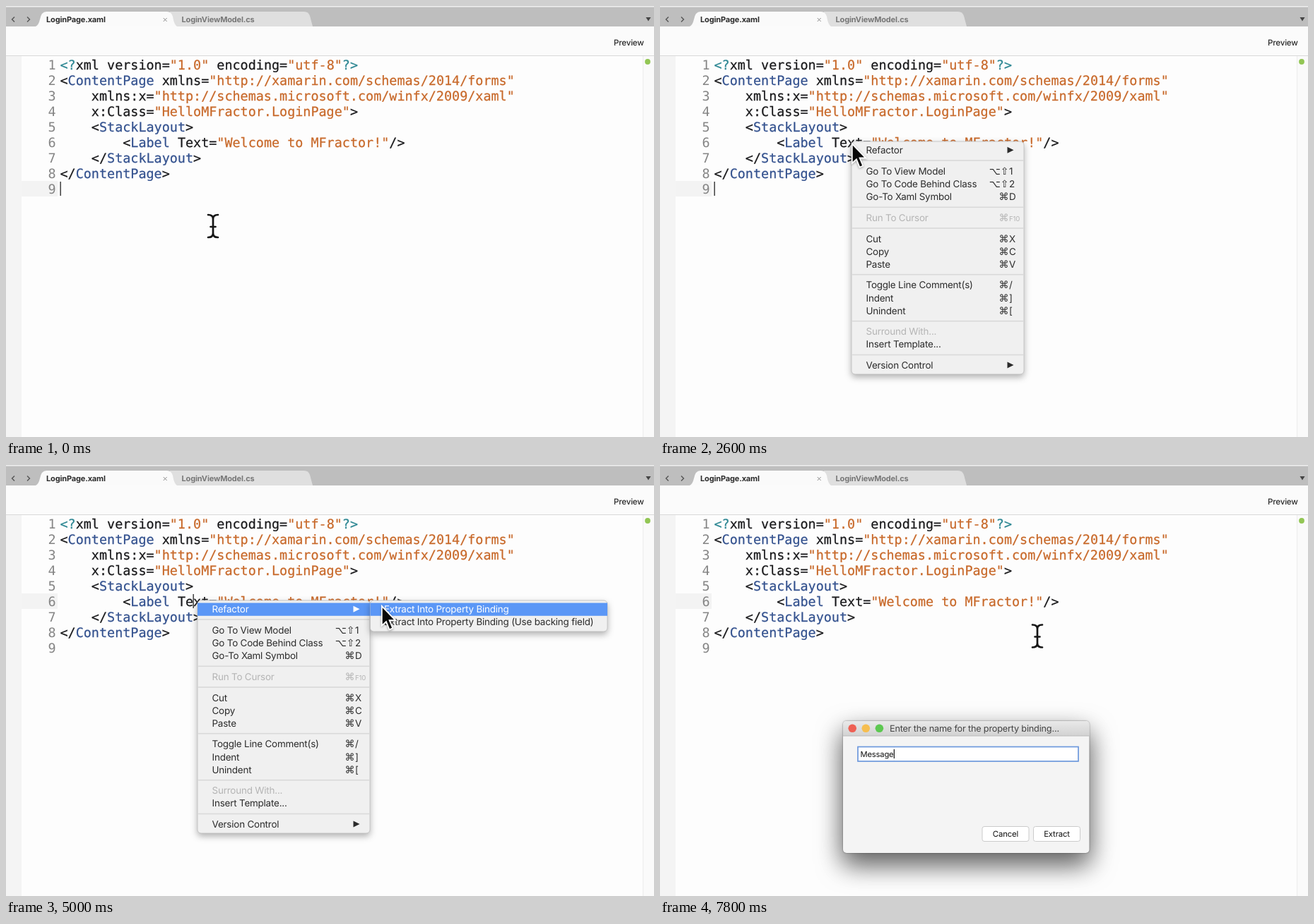
An HTML page that plays this animation: 917 by 611 pixels, repeating every 8000 ms.

```html
<!DOCTYPE html>
<html lang="en">
<head>
<meta charset="utf-8">
<title>Extract property binding</title>
<style>
html, body { margin: 0; width: 100%; height: 100%; overflow: hidden; background: #fdfdfd; }
svg { display: block; width: 100vw; height: 100vh; }
text { white-space: pre; font: 13.43px Inter, "Noto Sans", sans-serif; letter-spacing: -.015em; fill: #2b2b2b; text-rendering: geometricPrecision; }
.code { font: 18.43px "DejaVu Sans Mono", monospace; letter-spacing: 0; fill: #1a1a1c; stroke: #1a1a1c; stroke-width: .25; }
.num { fill: #858585; stroke: none; text-anchor: end; }
.tag { fill: #34528f; stroke: #34528f; }
.str { fill: #c8692a; stroke: #c8692a; }
.pi { fill: #2d8793; stroke: #2d8793; }
.tab { font-size: 11px; font-weight: 700; }
.sig { font: 10.5px "DejaVu Sans Mono", monospace; letter-spacing: 0; }
.key { fill: #2b938d; }
.type { fill: #3a62a8; }
.body { font-size: 10.93px; fill: #444; }
.small { font-size: 8.95px; fill: #444; }
.mods { font: 14px "DejaVu Sans", sans-serif; letter-spacing: 0; text-anchor: end; }
.off { fill: #b4b4b4; }
.lit { fill: #fff; }
.field { font-size: 11.2px; fill: #111; }
.button { font-size: 11.4px; text-anchor: middle; fill: #111; }
.panel { fill: #f0f0f0; stroke: #bdbdbd; stroke-width: .8; filter: drop-shadow(0 4px 5px rgba(0,0,0,.3)); }
</style>
</head>
<body>
<svg id="stage" viewBox="0 0 917 611" preserveAspectRatio="none"></svg>
<script>
const LOOP = 8000, STEP = 200;

const esc = s => s.replace(/&/g, '&amp;').replace(/</g, '&lt;').replace(/>/g, '&gt;');
const span = (cls, s, extra = '') => `<tspan class="${cls}" ${extra}>${esc(s)}</tspan>`;
const rich = (x, y, inner, cls = '', id = '') =>
  `<text x="${x}" y="${y}" class="${cls}" id="${id}">${inner}</text>`;
const text = (x, y, s, cls, id) => rich(x, y, esc(s), cls, id);
const rect = (x, y, w, h, fill, extra = '') =>
  `<rect x="${x}" y="${y}" width="${w}" height="${h}" fill="${fill}" ${extra}/>`;
const path = (d, fill, extra = '') => `<path d="${d}" fill="${fill}" ${extra}/>`;
const group = (id, inner) => `<g id="${id}">${inner}</g>`;
const arrowRight = y => path(`M491.5 ${y - 4.5}L500.5 ${y}L491.5 ${y + 4.5}Z`, 'currentColor');

const source = [
  '<?xml version="1.0" encoding="utf-8"?>',
  '<ContentPage xmlns="http://xamarin.com/schemas/2014/forms"',
  '    xmlns:x="http://schemas.microsoft.com/winfx/2009/xaml"',
  '    x:Class="HelloMFractor.LoginPage">',
  '    <StackLayout>',
  '        <Label Text="Welcome to MFractor!"/>',
  '    </StackLayout>',
  '</ContentPage>',
  ''
];

function highlight(line) {
  return line.split(/("[^"]*"|<\?|\?>|<\/?[A-Z]\w+)/).map(part => {
    if (part[0] === '"') return span('str', part);
    if (part === '<?' || part === '?>') return span('pi', part);
    const tag = part.match(/^(<\/?)([A-Z]\w+)$/);
    return tag ? esc(tag[1]) + span('tag', tag[2]) : esc(part);
  }).join('');
}

function editor() {
  const lines = source.map((line, i) => {
    const y = 90 + i * 22;
    return text(70.5, y, String(i + 1), 'code num') + rich(76.5, y, highlight(line), 'code');
  }).join('');
  return rect(0, 0, 917, 611, '#fdfdfd') +
    rect(0, 71, 22, 540, '#f4f4f4') +
    rect(901, 71, 16, 540, '#fafafa') + rect(901, 71, 1, 540, '#ececec') +
    '<circle cx="908" cy="79" r="3.9" fill="#92c654"/>' +
    rect(22, 248, 51, 22, '#f3f3f3', 'id="row"') + lines +
    rect(76.5, 249, 1.3, 20, '#222', 'id="caret"');
}

function chrome() {
  const stroke = 'stroke="#555" stroke-width="1.4"';
  return rect(0, 0, 917, 1.5, '#ededed') + rect(0, 1.5, 917, 28, '#bebebe') +
    path('M232 8H422Q428 8 430 14L434 29H232Z', '#dfdfdf') +
    path('M41 29.5Q46 28 48 19Q50 8 57 8H228Q234 8 236 15Q238 28 243 29.5Z', '#fafafa') +
    rect(0, 29, 917, 41, '#fbfbfb') + rect(0, 70, 917, 1, '#d9d9d9') +
    path('M12 15.5L8.5 19L12 22.5M30 15.5L33.5 19L30 22.5', 'none', stroke) +
    path('M222.7 17L227.7 22M227.7 17L222.7 22', 'none', 'stroke="#8c8c8c"') +
    path('M905.5 16H912.5L909 21.5Z', '#444') +
    text(57, 23, 'LoginPage.xaml', 'tab') +
    rich(248.5, 23, span('', 'LoginViewModel.cs', 'fill="#777"'), 'tab') +
    rich(860, 56, span('', 'Preview', 'font-size="11.6" font-weight="500"'));
}

function tooltip() {
  const keys = s => span('key', s);
  const italic = (s, rest) => span('', s, 'font-style="italic"') + esc(rest);
  return rect(104, 210, 334, 177.5, '#fafae6', 'rx="3" stroke="#f3f3e2" stroke-width=".8"') +
    rich(116.5, 229.5, keys('public') + ' ' + span('type', 'string') + ' Text { ' +
      keys('get') + '; ' + keys('set') + '; }', 'sig') +
    rich(116.5, 262.5, span('', 'Summary', 'font-size="11.8" font-weight="700"'), 'body') +
    text(116.5, 283.5, 'Gets or sets the text for the Label. This is a bindable property.', 'body') +
    text(116.5, 305.3, 'From type:', 'small') + text(175.5, 305.3, 'Label', 'small') +
    text(116.5, 316, 'Assembly:', 'small') + text(175.5, 316, 'Xamarin.Forms.Core', 'small') +
    rich(116.5, 338.7, italic('Command+D', ' to go to declaration'), 'small') +
    rich(116.5, 349, italic('Alt+Enter', ' to view 1 available code action'), 'small') +
    rich(116.5, 370, span('', 'Powered By KWendral', 'font-size="7.7" font-weight="700"'), 'small');
}

const menuItems = [
  [234, 'Go To View Model', '⌥⇧', '1'],
  [252.3, 'Go To Code Behind Class', '⌥⇧', '2'],
  [270.5, 'Go-To Xaml Symbol', '⌘', 'D'],
  [300, 'Run To Cursor', '⌘', 'F10', 'off'],
  [329.7, 'Cut', '⌘', 'X'],
  [348, 'Copy', '⌘', 'C'],
  [366, 'Paste', '⌘', 'V'],
  [395.5, 'Toggle Line Comment(s)', '⌘', '/'],
  [413.7, 'Indent', '⌘', ']'],
  [432, 'Unindent', '⌘', '['],
  [461.3, 'Surround With...', '', '', 'off'],
  [479.5, 'Insert Template...', '', ''],
  [509, 'Version Control', '', '']
];

function menu() {
  const items = menuItems.map(([y, label, mods, key, cls = '']) =>
    text(291.5, y + 4.8, label, cls) + text(493.5, y + 4.8, mods, 'mods ' + cls) +
    rich(494, y + 4.8, span(cls, key, key.length > 1 ? 'font-size="9.6"' : ''))).join('');
  const rules = [219, 285.3, 315, 380.7, 446.7, 494.5]
    .map(y => rect(271.5, y - .8, 243, 1.6, '#d9d9d9')).join('');
  return rect(271, 192, 244, 330, '', 'rx="5" class="panel"') + rules + items +
    `<g color="#2b2b2b">${arrowRight(509)}</g>` +
    rect(271, 195.5, 244, 18.3, '#5b97f6', 'id="refactorBar"') +
    text(291.5, 209, 'Refactor', '', 'refactorText') +
    `<g id="refactorArrow" color="#2b2b2b">${arrowRight(204.3)}</g>`;
}

function submenu() {
  return rect(515.4, 192, 335.6, 44, '', 'rx="5" class="panel"') +
    rect(515.4, 195.5, 335.6, 18.3, '#5b97f6', 'id="extractBar"') +
    text(535, 209, 'Extract Into Property Binding', '', 'extractText') +
    text(535, 227.3, 'Extract Into Property Binding (Use backing field)');
}

function dialog() {
  const lights = ['#ee6054', '#f6be4f', '#5dc851']
    .map((c, i) => `<circle cx="${272.2 + i * 19.1}" cy="373.3" r="5.8" fill="${c}"/>`).join('');
  const button = (x, label) =>
    rect(x, 512.5, 66, 21, '#fff', 'rx="3" stroke="#cbcbcb"') + text(x + 33, 527, label, 'button');
  return rect(259, 363, 348.5, 187, '#f4f4f4',
      'rx="5" style="filter:drop-shadow(0 16px 18px rgba(0,0,0,.5)) drop-shadow(0 0 1px rgba(0,0,0,.5))"') +
    path('M259 384V368Q259 363 264 363H602.5Q607.5 363 607.5 368V384Z', 'url(#bar)') +
    rect(259, 383.5, 348.5, 1, '#bcbcbc') + lights +
    rich(325, 378, span('', 'Enter the name for the property binding...', 'font-size="12.72" fill="#444"')) +
    rect(280, 399.5, 312, 20.5, '#fff', 'stroke="#6d98dc" stroke-width="1.7"') +
    text(283.5, 414, '', 'field', 'entry') +
    rect(283.8, 403, 1.2, 13, '#111', 'id="entryCaret"') +
    button(456, 'Cancel') + button(528.5, 'Extract');
}

function pointers() {
  const beam = 'M-7 -16C-2 -16 0 -14 0 -10V10C0 14 -2 16 -7 16M7 -16C2 -16 0 -14 0 -10M0 10C0 14 2 16 7 16M-3.5 1H3.5';
  return group('beam', path(beam, 'none', 'stroke="#fff" stroke-width="5" stroke-linecap="round"') +
      path(beam, 'none', 'stroke="#161616" stroke-width="2.7" stroke-linecap="round"')) +
    group('arrow', path('M.8 .8V28.5L7 22.8L11.5 34L16.2 32L11.6 21H20.3Z', '#080808',
      'stroke="#fff" stroke-width="1.8" style="filter:drop-shadow(0 1px 1.5px rgba(0,0,0,.35))"'));
}

document.getElementById('stage').innerHTML =
  '<defs><linearGradient id="bar" x2="0" y2="1"><stop stop-color="#e9e9e9"/>' +
  '<stop offset="1" stop-color="#d2d2d2"/></linearGradient></defs>' +
  editor() + chrome() + group('tooltip', tooltip()) + group('menu', menu()) +
  group('submenu', submenu()) + group('dialog', dialog()) + pointers();

const el = id => document.getElementById(id);
const show = (id, on) => el(id).style.display = on ? '' : 'none';
const within = (t, from, to) => t >= from && t < to;

// time, x, y
const track = [
  [0, 293, 312], [200, 293, 312], [1000, 271, 196], [2400, 271, 196],
  [2600, 271, 194.5], [2800, 271, 194.5], [3400, 316, 193.5], [3800, 316, 193.5],
  [4800, 531, 199], [5400, 531, 200], [5600, 531, 200], [6200, 534, 242.5], [LOOP, 534, 242.5]
];

function pointerAt(t) {
  const i = track.findIndex(k => k[0] > t);
  const [t0, x0, y0] = track[i - 1], [t1, x1, y1] = track[i];
  const p = (t - t0) / (t1 - t0), e = p * p * (3 - 2 * p);
  return [x0 + (x1 - x0) * e, y0 + (y1 - y0) * e];
}

function draw(t) {
  const [x, y] = pointerAt(t);
  const isArrow = within(t, 2600, 5800);
  show('arrow', isArrow);
  show('beam', !isArrow);
  el(isArrow ? 'arrow' : 'beam').setAttribute('transform', `translate(${x} ${y})`);

  const onLabel = t >= 2800;
  const blink = (t < 2600 ? t : t - 2600) % 1200 < 600;
  el('row').setAttribute('y', onLabel ? 182 : 248);
  el('caret').setAttribute('x', onLabel ? 264.5 : 76.5);
  el('caret').setAttribute('y', onLabel ? 183 : 249);
  show('caret', blink && t < 5400);

  show('tooltip', within(t, 1600, 2600));
  show('menu', within(t, 2600, 5400));
  show('submenu', within(t, 3400, 5400));

  const refactor = t >= 3000, extract = x > 516;
  show('refactorBar', refactor);
  el('refactorText').setAttribute('class', refactor ? 'lit' : '');
  el('refactorArrow').setAttribute('color', refactor ? '#fff' : '#2b2b2b');
  show('extractBar', extract);
  el('extractText').setAttribute('class', extract ? 'lit' : '');

  show('dialog', t >= 5400);
  const typed = Math.max(0, Math.floor((t - 6200) / 200));
  el('entry').textContent = 'Message'.slice(0, typed);
  const width = typed ? el('entry').getComputedTextLength() : 0;
  el('entryCaret').setAttribute('x', 283.8 + width);
  show('entryCaret', typed > 0 || (t - 5400) % 1200 < 600);
}

function tick() {
  draw(Math.floor(performance.now() % LOOP / STEP) * STEP);
  requestAnimationFrame(tick);
}
tick();
</script>
</body>
</html>
```
